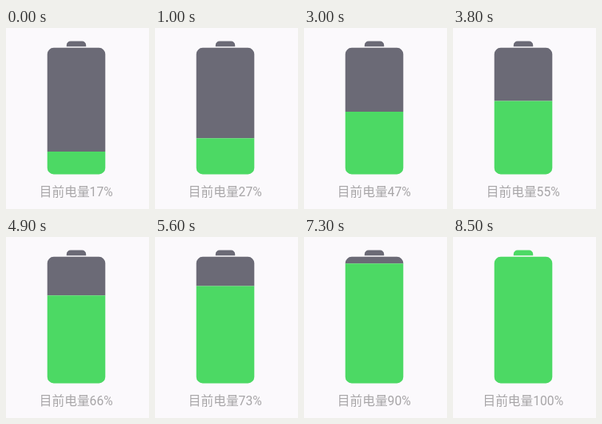
These frames come from a looping animation (179 by 227 pixels, 9.1 s). An HTML page with a canvas:

```html
<!DOCTYPE html>
<html lang="zh-CN">
<head>
<meta charset="utf-8">
<title>电量</title>
<style>
  html, body { margin: 0; width: 100%; height: 100%; overflow: hidden; background: #fbf9fc; }
  canvas { display: block; width: 179px; height: 227px; }
</style>
</head>
<body>
<canvas id="stage"></canvas>
<script>
const W = 179, H = 227, LOOP = 9100, STEP = 100, START = 17;
const TOP = 16.5, BOTTOM = 183.4;
const CX = 87.8;

const canvas = document.getElementById('stage');
const ctx = canvas.getContext('2d');
const dpr = window.devicePixelRatio || 1;
canvas.width = Math.round(W * dpr);
canvas.height = Math.round(H * dpr);
ctx.scale(dpr, dpr);

const battery = new Path2D();
battery.roundRect(75.8, TOP, 24.4, 6.7, [5, 5, 0, 0]);
battery.roundRect(51.7, 24.8, 72.6, BOTTOM - 24.8, 8);

function fillBand(color, top, bottom) {
  ctx.save();
  ctx.beginPath();
  ctx.rect(0, top, W, bottom - top);
  ctx.clip();
  ctx.fillStyle = color;
  ctx.fill(battery);
  ctx.restore();
}

function draw(time) {
  const percent = Math.min(100, START + Math.floor((time % LOOP) / STEP));
  const level = BOTTOM - (BOTTOM - TOP) * percent / 100;

  ctx.fillStyle = '#fbf9fc';
  ctx.fillRect(0, 0, W, H);
  if (percent < 100) fillBand('#6b6a76', 0, level);
  fillBand('#4cd964', percent < 100 ? level : 0, H);

  ctx.font = '15.7px Roboto, "Noto Sans CJK SC", "Noto Sans CJK", sans-serif';
  ctx.textAlign = 'center';
  ctx.textBaseline = 'alphabetic';
  ctx.fillStyle = '#a7a5a7';
  ctx.fillText('目前电量' + percent + '%', CX, 211);
}

const begin = performance.now();
function tick() {
  draw(performance.now() - begin);
  requestAnimationFrame(tick);
}
tick();
</script>
</body>
</html>
```
